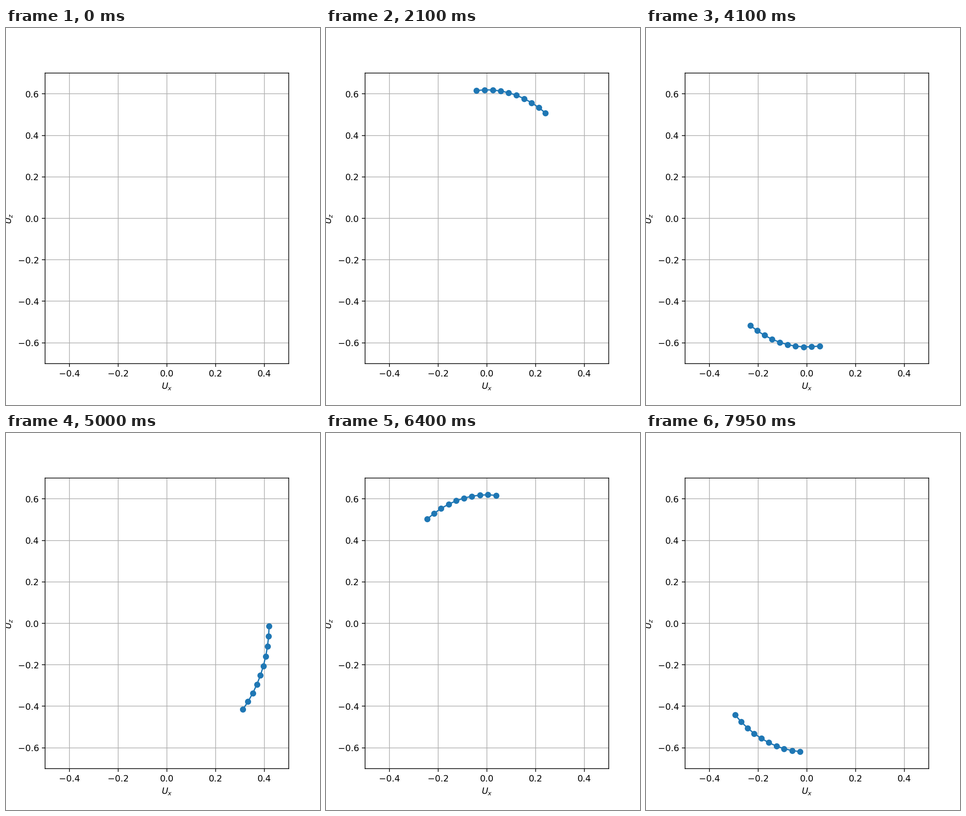
Recreate the animation shown at these times as a matplotlib script. Size 683x820 px, loop 8 s.

```python
import numpy as np
import matplotlib.pyplot as plt
from matplotlib.animation import FuncAnimation

W, H, DPI = 683, 820, 136.6
FRAMES, INTERVAL = 160, 50
AX, AZ = 0.42, 0.62          # half axes of the orbit
STEP = np.radians(4.5328)    # phase advance per frame
TRAIL = 10

# the tiny margin keeps the pixel size from being truncated downwards
fig, ax = plt.subplots(figsize=((W + 0.01) / DPI, (H + 0.01) / DPI), dpi=DPI)
ax.set_xlim(-0.5, 0.5)
ax.set_ylim(-0.7, 0.7)
ax.set_xticks(np.arange(-4, 5, 2) / 10)
ax.set_yticks(np.arange(-6, 7, 2) / 10)
ax.set_xlabel("$U_x$")
ax.set_ylabel("$U_z$")
ax.grid(True)

line, = ax.plot([], [], "o-", color="tab:blue")

phase = STEP * np.arange(FRAMES)
ux = AX * np.sin(phase)
uz = -AZ * np.cos(phase)


def update(n):
    part = slice(max(0, n - TRAIL), n)
    line.set_data(ux[part], uz[part])
    return line,


anim = FuncAnimation(fig, update, frames=FRAMES, interval=INTERVAL,
                     repeat=True, repeat_delay=0)
plt.show()
```
